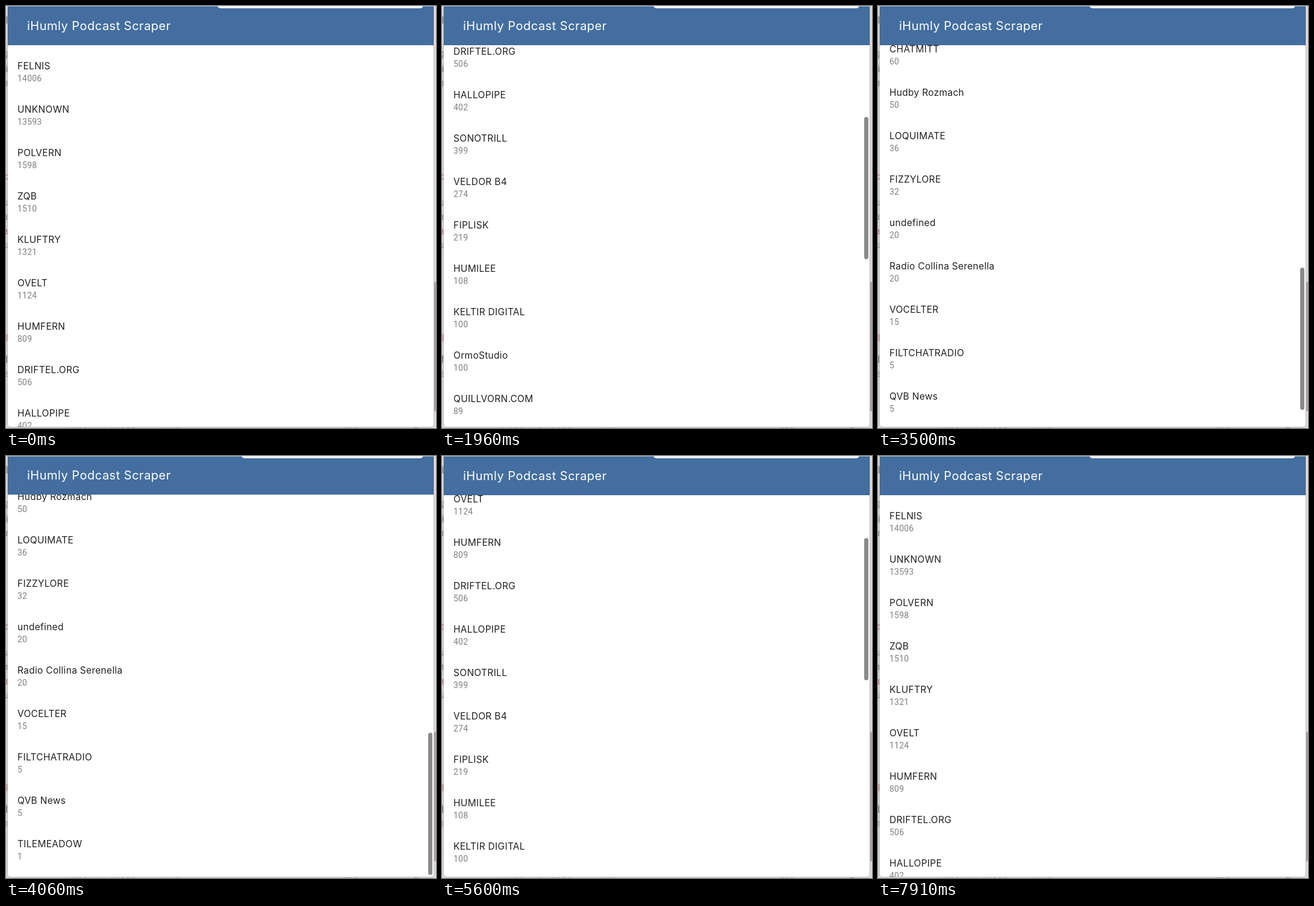
Recreate the animation shown at these times as an HTML page. Size 714 by 700 pixels, loop 7980 ms.

```html
<!DOCTYPE html>
<html lang="en">
<head>
<meta charset="utf-8">
<title>Podcast Scraper</title>
<style>
  html, body { margin: 0; width: 100%; height: 100%; overflow: hidden; background: #d8d8d8; }
  svg { display: block; width: 714px; height: 700px; }
  text { white-space: pre; }
  .title { font: 400 20px Inter, sans-serif; letter-spacing: .5px; fill: #fff; }
  .name { font: 400 15.5px Inter, sans-serif; letter-spacing: .3px; fill: #212121; }
  .count { font: 400 14px Roboto, sans-serif; letter-spacing: .2px; fill: #808080; }
  .behind { font: 400 16px Roboto, sans-serif; }
</style>
</head>
<body>
<svg viewBox="0 0 714 700" xmlns="http://www.w3.org/2000/svg">
  <defs>
    <clipPath id="window"><path d="M3 1H710V693a5 5 0 0 1-5 5H8a5 5 0 0 1-5-5z"/></clipPath>
  </defs>

  <rect width="714" height="700" fill="#d8d8d8"/>
  <g id="behind" class="behind"></g>
  <path d="M0 224.5H3M0 499.5H3M0 651.5H3" stroke="#c2c2c2"/>
  <g class="behind" fill="#aaa">
    <text x="94" y="708">(Clips) Via Usage</text>
    <text x="254" y="708">HOW</text>
    <text x="563" y="708">the</text>
    <text x="677" y="708" fill="#555">ll</text>
  </g>
  <rect x="710" width="4" height="700" fill="#e0dad7"/>
  <rect x="710" y="458" width="4" height="214" fill="#aaa19f"/>
  <rect x="2" width="709" height="1" fill="#b4bbc3"/>
  <path d="M2.5 1V693a5.5 5.5 0 0 0 5.5 5.5H705a5.5 5.5 0 0 0 5.5-5.5V1" fill="none" stroke="#b9b9b9"/>

  <g clip-path="url(#window)">
    <rect x="3" y="1" width="707" height="697" fill="#fff"/>
    <g id="page">
      <g id="rows"></g>
      <rect x="3" y="-20" width="707" height="85" fill="#436e9f"/>
      <rect x="3.5" y="1.5" width="706" height="63" fill="none" stroke="#3a6494"/>
      <text class="title" x="35" y="40">iHumly Podcast Scraper</text>
    </g>
    <rect id="thumb" x="701" width="7" height="236" rx="3.5" fill="#000"/>
  </g>
  <rect id="card" y="-10" height="14" rx="5" fill="#f0f3f4" stroke="#3b628f" stroke-opacity=".35"/>
</svg>

<script>
const LOOP = 7980, STEP = 70, ROW = 72;

const hosts = [
  ['FELNIS', 14006], ['UNKNOWN', 13593], ['POLVERN', 1598], ['ZQB', 1510],
  ['KLUFTRY', 1321], ['OVELT', 1124], ['HUMFERN', 809], ['DRIFTEL.ORG', 506],
  ['HALLOPIPE', 402], ['SONOTRILL', 399], ['VELDOR B4', 274], ['FIPLISK', 219],
  ['HUMILEE', 108], ['KELTIR DIGITAL', 100], ['OrmoStudio', 100], ['QUILLVORN.COM', 89],
  ['VOLTIRK (FELNIS)', 84], ['CHATMITT', 60], ['Hudby Rozmach', 50], ['LOQUIMATE', 36],
  ['FIZZYLORE', 32], ['undefined', 20], ['Radio Collina Serenella', 20], ['VOCELTER', 15],
  ['FILTCHATRADIO', 5], ['QVB News', 5], ['TILEMEADOW', 1]
];

// Letter ends of the page behind the window: [letter, baseline, colour]
const edge = [
  ['l', 29, '#333'], ['g', 84, '#777'], ['i', 110, '#444'], ['a', 133, '#777'],
  ['o', 288, '#b9545a'], ['u', 331, '#777'], ['a', 355, '#777'], ['a', 379, '#b9545a'],
  ['u', 402, '#777'], ['l', 556, '#c0474d'], ['f', 592, '#777'], ['e', 615, '#777']
];

// [time, value]
const scrollKeys = [[1050, 0], [1960, 528], [2940, 933], [3780, 1327], [4130, 1327],
  [4900, 826], [6300, 22], [6370, 0]];
const bounceKeys = [[3780, 0], [3850, -8], [3920, -5], [3990, -2], [4060, -1], [4130, 0],
  [6300, 0], [6370, 3], [6440, 1], [6510, 0]];
const fadeKeys = [[630, 0], [700, .3], [770, .455], [6440, .455], [6510, .25], [6580, 0]];

const $ = id => document.getElementById(id);

function addText(parent, content, attrs) {
  const node = document.createElementNS('http://www.w3.org/2000/svg', 'text');
  for (const key in attrs) node.setAttribute(key, attrs[key]);
  node.textContent = content;
  parent.append(node);
}

hosts.forEach(([name, count], i) => {
  addText($('rows'), name, { class: 'name', x: 19, y: 105 + i * ROW });
  addText($('rows'), count, { class: 'count', x: 19, y: 125 + i * ROW });
});
edge.forEach(([letter, y, fill]) =>
  addText($('behind'), letter, { x: 4, y, fill, 'text-anchor': 'end' }));

const slope = (keys, i) => (keys[i + 1][1] - keys[i][1]) / (keys[i + 1][0] - keys[i][0]);

// Harmonic mean of both neighbours keeps the curve from overshooting.
function tangent(keys, i) {
  if (i === 0 || i === keys.length - 1) return 0;
  const a = slope(keys, i - 1), b = slope(keys, i);
  return a * b > 0 ? 2 * a * b / (a + b) : 0;
}

function sample(keys, t, smooth) {
  const last = keys.length - 1;
  if (t <= keys[0][0]) return keys[0][1];
  if (t >= keys[last][0]) return keys[last][1];
  const i = keys.findIndex(key => key[0] > t) - 1;
  const [t0, v0] = keys[i], [t1, v1] = keys[i + 1];
  const span = t1 - t0, u = (t - t0) / span;
  if (!smooth) return v0 + (v1 - v0) * u;
  const w = 1 - u;
  return v0 * (1 + 2 * u) * w * w + v1 * u * u * (3 - 2 * u)
    + span * u * w * (tangent(keys, i) * w - tangent(keys, i + 1) * u);
}

function draw(t) {
  const scroll = Math.round(sample(scrollKeys, t, true));
  const bounce = sample(bounceKeys, t);
  $('rows').setAttribute('transform', `translate(0 ${-scroll})`);
  $('page').setAttribute('transform', `translate(0 ${bounce})`);
  $('thumb').setAttribute('y', Math.round(2.6 + scroll * .3443));
  $('thumb').setAttribute('opacity', sample(fadeKeys, t));
  const left = bounce < 0 ? 391 : 351;
  $('card').setAttribute('x', left);
  $('card').setAttribute('width', 693 - left);
}

const start = performance.now();
function tick() {
  const t = (performance.now() - start) % LOOP;
  draw(Math.floor(t / STEP) * STEP);
  requestAnimationFrame(tick);
}
tick();
</script>
</body>
</html>
```
